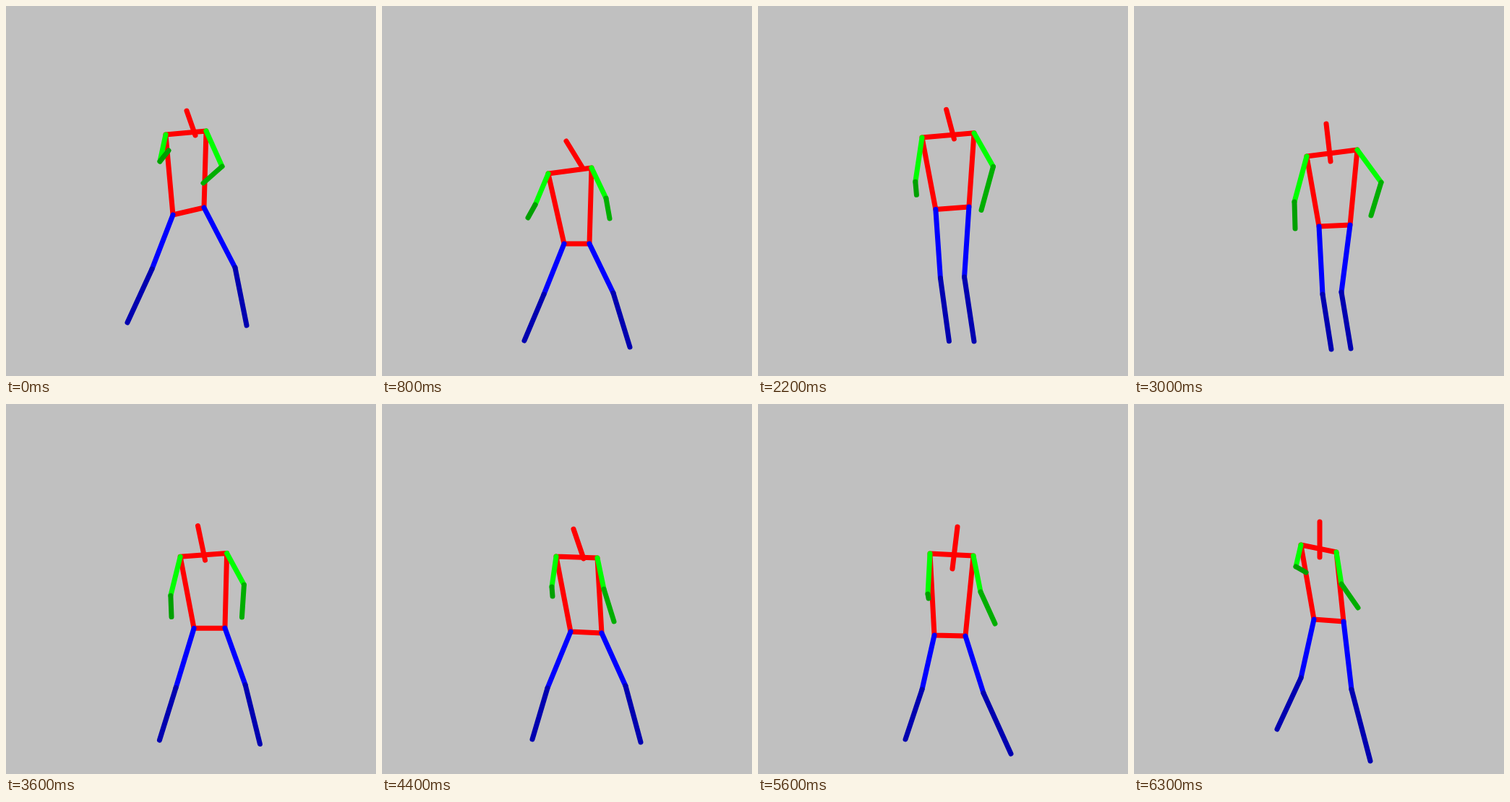
An HTML page with a canvas for the animation above (6.4 s loop, 512x512 px).

```html
<!DOCTYPE html>
<html lang="en">
<head>
<meta charset="utf-8">
<title>Stick figure</title>
<style>
  html, body { margin: 0; width: 100%; height: 100%; overflow: hidden; background: #c0c0c0; }
  canvas { display: block; width: 512px; height: 512px; }
</style>
</head>
<body>
<canvas id="stage" width="512" height="512"></canvas>
<script>
const LOOP = 6400, STEP = 100;
const ctx = document.getElementById('stage').getContext('2d');

// Each row: time, then x, y per joint.
// head, neck, left shoulder, right shoulder, left hip, right hip
const torso = [
  [0,    250, 145, 262, 179, 221, 178, 277, 173, 231, 289, 274, 279],
  [200,  250, 141, 265, 176, 222, 175, 279, 169, 235, 286, 276, 277],
  [800,  255, 187, 277, 223, 230, 232, 290, 224, 252, 329, 287, 329],
  [1500, 256, 144, 273, 176, 221, 180, 290, 176, 242, 281, 287, 278],
  [3000, 266, 163, 272, 215, 239, 208, 309, 199, 256, 305, 299, 303],
  [4400, 265, 173, 279, 214, 241, 211, 298, 213, 261, 315, 304, 317],
  [5600, 276, 170, 269, 228, 238, 207, 298, 210, 244, 320, 287, 321],
  [6300, 257, 163, 257, 212, 231, 195, 280, 205, 249, 298, 290, 301]
];
// left elbow, left wrist, right elbow, right wrist
const arms = [
  [0,    213, 215, 225, 200, 299, 222, 273, 245],
  [800,  212, 275, 202, 293, 310, 266, 315, 294],
  [1500, 215, 234, 214, 239, 309, 222, 299, 282],
  [3000, 222, 271, 223, 308, 342, 244, 328, 290],
  [4400, 235, 253, 236, 266, 307, 256, 321, 301],
  [5600, 235, 263, 236, 269, 308, 260, 328, 304],
  [6300, 224, 225, 238, 233, 287, 249, 310, 282]
];
// left knee, left ankle, right knee, right ankle
const legs = [
  [0,    202, 364, 168, 438, 317, 362, 333, 442],
  [800,  224, 399, 197, 463, 320, 397, 343, 472],
  [1500, 233, 367, 226, 454, 305, 366, 323, 459],
  [3000, 261, 399, 273, 475, 287, 396, 300, 474],
  [3700, 232, 392, 206, 464, 336, 388, 357, 470],
  [4400, 229, 393, 208, 464, 337, 390, 358, 468],
  [5600, 227, 395, 204, 464, 312, 400, 350, 484],
  [6300, 231, 379, 198, 450, 301, 395, 327, 494]
];

const slope = (a, b, c) => (b[c] - a[c]) / (b[0] - a[0]);

// Time-weighted tangent at key i, one-sided at the ends.
function tangent(keys, i, c) {
  const prev = keys[i - 1], key = keys[i], next = keys[i + 1];
  if (!prev) return slope(key, next, c);
  if (!next) return slope(prev, key, c);
  const before = key[0] - prev[0], after = next[0] - key[0];
  return (slope(prev, key, c) * after + slope(key, next, c) * before) / (before + after);
}

// Cubic Hermite interpolation of every joint at time t.
function pose(keys, t) {
  let i = 0;
  while (i < keys.length - 2 && t >= keys[i + 1][0]) i++;
  const a = keys[i], b = keys[i + 1], span = b[0] - a[0];
  const u = Math.min(1, (t - a[0]) / span), v = 1 - u;
  const at = c =>
    a[c] * v * v * (1 + 2 * u) + b[c] * u * u * (3 - 2 * u) +
    span * u * v * (v * tangent(keys, i, c) - u * tangent(keys, i + 1, c));
  const points = [];
  for (let c = 1; c < a.length; c += 2) points.push([at(c), at(c + 1)]);
  return points;
}

function stroke(color, first, ...rest) {
  ctx.strokeStyle = color;
  ctx.beginPath();
  ctx.moveTo(...first);
  rest.forEach(p => ctx.lineTo(...p));
  ctx.stroke();
}

function limb(root, joint, end, upper, lower) {
  stroke(upper, root, joint);
  stroke(lower, joint, end);
}

function draw(t) {
  const [head, neck, shoulderL, shoulderR, hipL, hipR] = pose(torso, t);
  const [elbowL, wristL, elbowR, wristR] = pose(arms, t);
  const [kneeL, ankleL, kneeR, ankleR] = pose(legs, t);

  ctx.fillStyle = '#c0c0c0';
  ctx.fillRect(0, 0, 512, 512);
  ctx.lineWidth = 7;
  ctx.lineCap = ctx.lineJoin = 'round';

  stroke('#f00', head, neck);
  stroke('#f00', shoulderL, shoulderR, hipR, hipL, shoulderL);
  limb(shoulderL, elbowL, wristL, '#0f0', '#00a000');
  limb(shoulderR, elbowR, wristR, '#0f0', '#00ae00');
  limb(hipL, kneeL, ankleL, '#00f', '#0000b0');
  limb(hipR, kneeR, ankleR, '#00f', '#0000b0');
}

const start = performance.now();
function tick() {
  const t = (performance.now() - start) % LOOP;
  draw(Math.floor(t / STEP) * STEP);
  requestAnimationFrame(tick);
}
tick();
</script>
</body>
</html>
```
